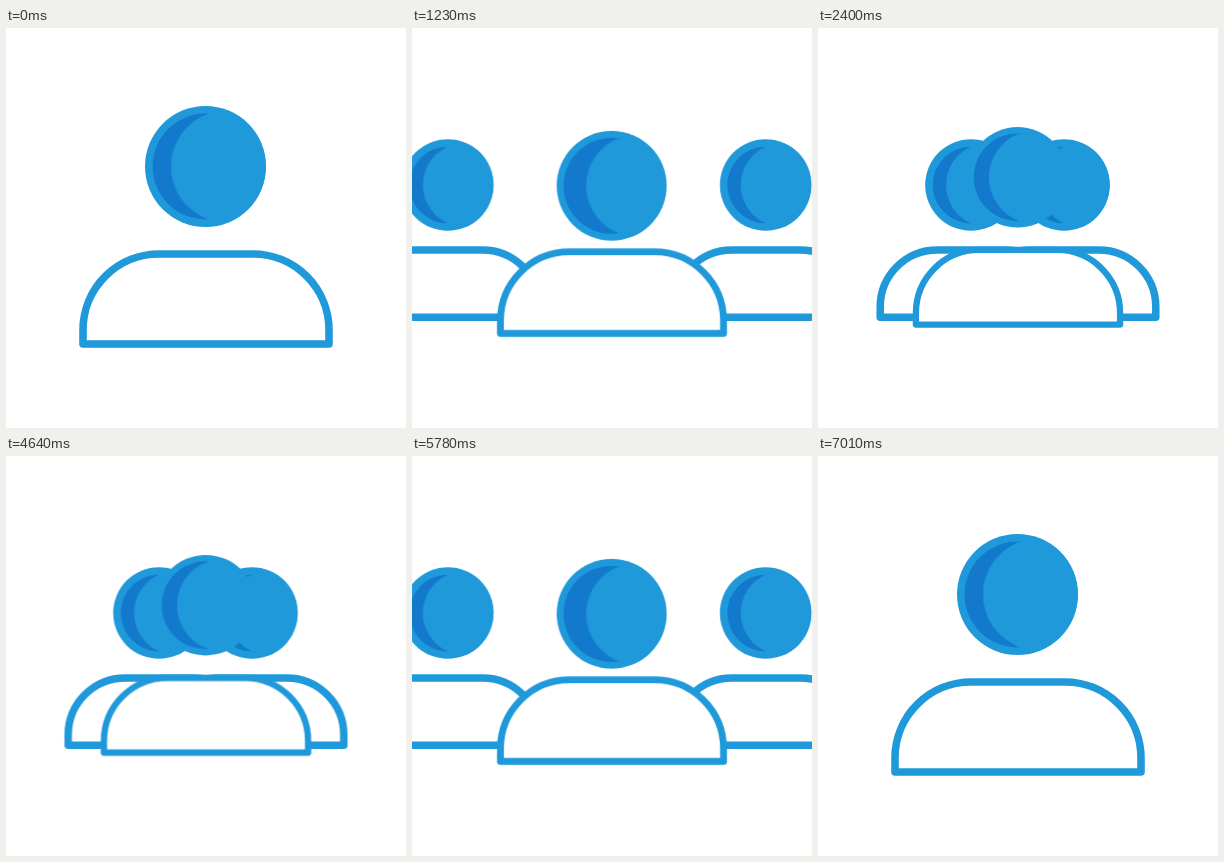
An HTML page that plays this animation: 400x400 px, repeating every 9.04 s.

```html
<!DOCTYPE html>
<html lang="en">
<head>
<meta charset="utf-8">
<title>Group</title>
<style>
  html, body { margin: 0; width: 100%; height: 100%; overflow: hidden; background: #fff; }
  svg { display: block; width: 100vw; height: 100vh; }

  .body { fill: #fff; stroke: #2099db; stroke-linejoin: round; }
  .skin { fill: #2099db; }
  .shade { fill: #1279cc; }

  /* Every motion is scrubbed by --p, the playhead in ms (0 to 2400). */
  .move {
    animation: 2400ms cubic-bezier(.364, 0, .636, 1) calc(var(--p, 0) * -1ms) both paused;
  }
  .main { transform-origin: 200px 202px; animation-name: shrink; }
  .hop { animation-name: hop; }
  .turn { animation-name: turn; }
  .left { --from: -146.5px; --to: 153.5px; animation-name: enter; }
  .right { --from: 522px; --to: 246.5px; animation-name: enter; }

  @keyframes shrink {
    0%, 29.167% { transform: scale(1); }
    70.833%, 100% { transform: scale(.83); }
  }
  @keyframes hop {
    0% { transform: translateY(0); }
    21.667% { transform: translateY(-28px); }
    50% { transform: translateY(15px); }
    70.833% { transform: translateY(-13px); }
    100% { transform: translateY(0); }
  }
  @keyframes turn {
    0%, 100% { transform: translateX(21.5px); }
    33.333% { transform: translateX(29.3px); }
  }
  @keyframes enter {
    0%, 25.833% { transform: translateX(var(--from)); }
    70.417%, 100% { transform: translateX(var(--to)); }
  }
</style>
</head>
<body>
<svg viewBox="0 0 400 400">
  <defs>
    <clipPath id="bigClip"><circle cx="199.5" cy="138.5" r="60.3"/></clipPath>
    <clipPath id="smallClip"><circle cx="-.5" cy="157" r="45.6"/></clipPath>
    <g id="friend">
      <path class="body" stroke-width="7.5"
        d="M-91.3 289.2V279A57 57 0 0 1-34.3 222H34.3A57 57 0 0 1 91.3 279V289.2Z"/>
      <circle class="skin" cx="-.5" cy="157" r="45.8"/>
      <g clip-path="url(#smallClip)">
        <circle class="shade" cx="-.5" cy="157" r="38.3"/>
        <circle class="skin" cx="16.5" cy="157" r="42"/>
      </g>
    </g>
  </defs>

  <g class="move left"><use href="#friend"/></g>
  <g class="move right"><use href="#friend"/></g>

  <g class="move main">
    <path class="body" stroke-width="7.6"
      d="M77 316V302A76 76 0 0 1 153 226H247A76 76 0 0 1 323 302V316Z"/>
    <g class="move hop">
      <circle class="skin" cx="199.5" cy="138.5" r="60.5"/>
      <g clip-path="url(#bigClip)">
        <circle class="shade" cx="199.5" cy="138.5" r="52.9"/>
        <circle class="skin move turn" cx="199.5" cy="138.5" r="56"/>
      </g>
    </g>
  </g>
</svg>
<script>
  const LOOP = 9040, LENGTH = 2400, BACK = 4640, TICK = 30;
  const start = performance.now();
  const snap = ms => Math.floor(ms / TICK) * TICK;

  // Plays forward, rests, plays backward, rests.
  function playhead(t) {
    return t < BACK
      ? Math.min(snap(t), LENGTH)
      : Math.max(LENGTH - TICK - snap(t - BACK), 0);
  }

  function draw() {
    const t = (performance.now() - start) % LOOP;
    document.documentElement.style.setProperty('--p', playhead(t));
    requestAnimationFrame(draw);
  }
  draw();
</script>
</body>
</html>
```
